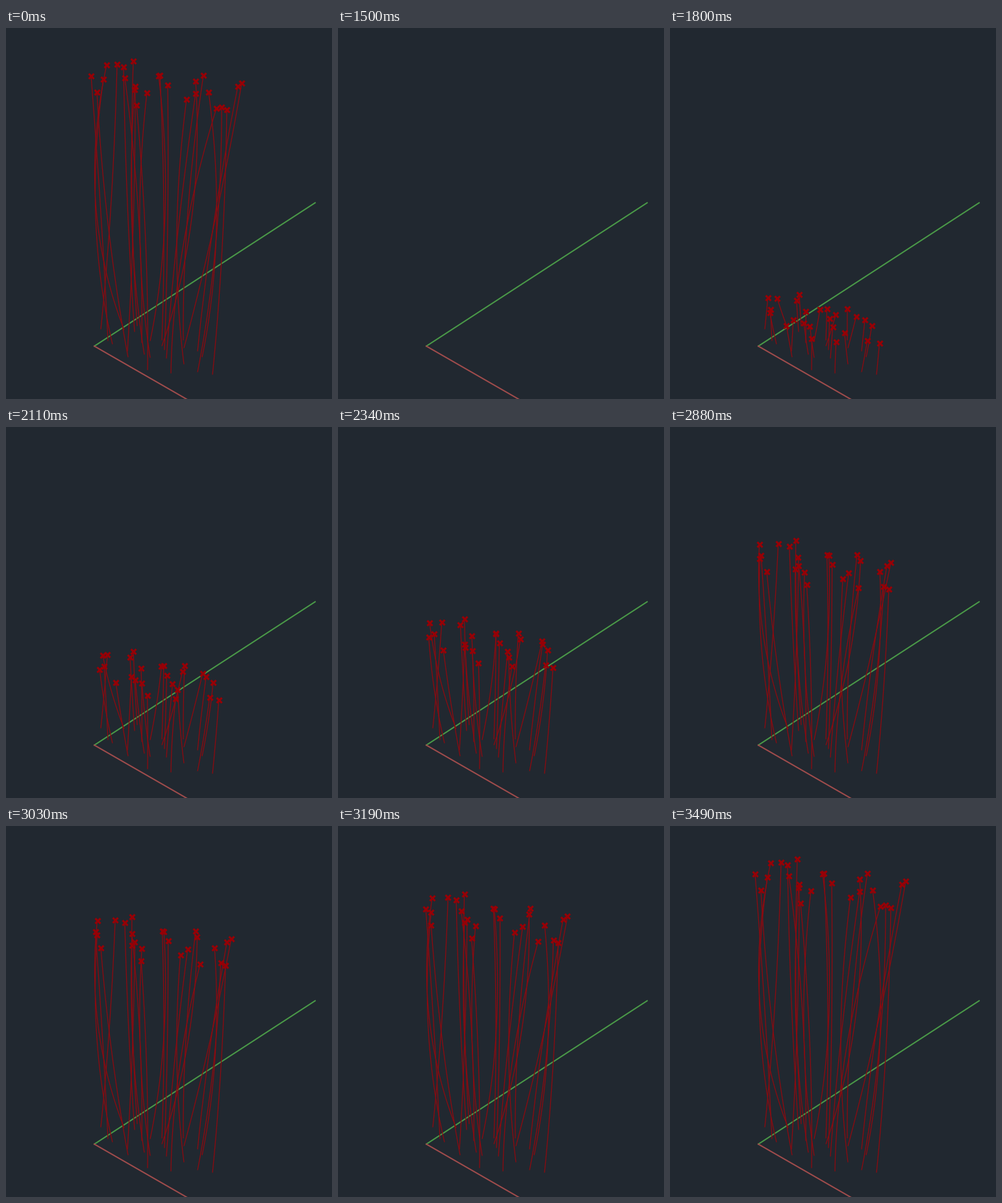
Recreate the animation shown at these times as a matplotlib script. Size 502 by 572 pixels, loop 4570 ms.

```python
import numpy as np
import matplotlib.pyplot as plt
from matplotlib.animation import FuncAnimation
from matplotlib.collections import LineCollection

W, H, DPI = 502, 572, 64
PX = 72 / DPI                 # points per pixel
TICK = 10                     # ms per drawn frame
LOOP, HOLD = 4570, 1500       # ms
STEP = 76.9                   # ms per simulation step
LAST = 25                     # steps in a full climb
SUB = 4                       # curve samples per step

# Per climber: x at the foot, halfway and at the top, then y at the top
CLIMBERS = np.array([
    (164, 138, 150, 79), (157, 146, 131, 74), (146, 162, 171, 56),
    (182, 138, 155, 57), (188, 158, 140, 99), (187, 196, 199, 90),
    (198, 187, 181, 60), (202, 194, 196, 51), (213, 194, 198, 95),
    (209, 204, 183, 77), (222, 206, 217, 100), (218, 215, 201, 119),
    (222, 245, 235, 74), (240, 243, 237, 73), (244, 249, 249, 88),
    (247, 265, 292, 101), (254, 273, 324, 124), (240, 286, 292, 82),
    (273, 280, 304, 73), (274, 263, 278, 110), (274, 322, 363, 85),
    (302, 324, 312, 99), (295, 320, 357, 90), (295, 323, 332, 122),
    (318, 333, 340, 126),
])


def climb(foot, mid, top, top_y):
    """Bowed path from foot to top; the climb gets slightly faster."""
    u = np.linspace(0, 1, (LAST - 1) * SUB + 1)
    bow = mid - (foot + top) / 2
    left = (LAST - 1) * (1 - u)
    x = foot + (top - foot) * u + 4 * bow * u * (1 - u)
    y = top_y + 18.1 * left - 0.045 * left ** 2
    return np.column_stack([x, y])


curves = np.array([climb(*c) for c in CLIMBERS])

fig = plt.figure(figsize=(W / DPI, H / DPI), dpi=DPI, facecolor="#212830")
ax = fig.add_axes([0, 0, 1, 1])
ax.set(xlim=(0, W), ylim=(H, 0))
ax.axis("off")

ax.plot([136, 476], [490.5, 269.5], color="#4a9a48", lw=2 * PX)
ax.plot([136, 280], [490.5, 573.3], color="#a04c4c", lw=2 * PX)
trails = LineCollection([], colors="#8c0a10", linewidths=1.3 * PX, zorder=3)
ax.add_collection(trails, autolim=False)
heads, = ax.plot([], [], "x", color="#960006", ms=7.5 * PX, mew=3.2 * PX,
                 zorder=4)


def step_at(ms):
    if ms < HOLD:
        return LAST
    return min(LAST, int((ms - HOLD + 9.9) / STEP))


def draw(i):
    k = step_at(i * TICK)
    if k < 1:
        trails.set_segments([])
        heads.set_data([], [])
    else:
        end = (k - 1) * SUB
        trails.set_segments(list(curves[:, :end + 1]) if end else [])
        heads.set_data(curves[:, end, 0], curves[:, end, 1])
    return trails, heads


anim = FuncAnimation(fig, draw, frames=LOOP // TICK, interval=TICK,
                     repeat=True, repeat_delay=0, blit=False)
plt.show()
```
